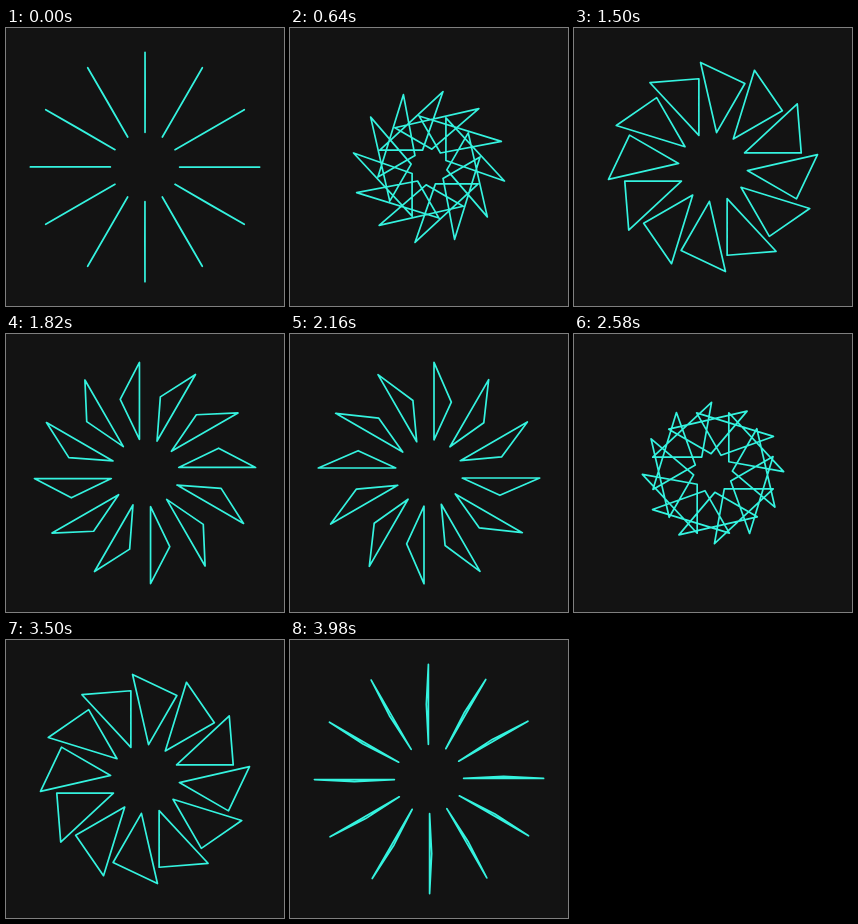
Recreate the animation shown at these times as an HTML page. Size 278 by 278 pixels, loop 4 s.

```html
<!DOCTYPE html>
<html lang="en">
<head>
<meta charset="utf-8">
<title>Folding triangles</title>
<style>
  html, body { margin: 0; width: 100%; height: 100%; overflow: hidden; background: #131313; }
  svg { display: block; width: 100%; height: 100%; }
  path { fill: none; stroke: #34f3df; stroke-width: 1.7; stroke-linejoin: round; }
</style>
</head>
<body>
<svg viewBox="-139 -139 278 278"><path id="ring"/></svg>
<script>
  const LOOP = 4000;
  const COUNT = 12;
  const SIDE = 80;
  const GAP = 20;

  // Equilateral triangle, set inside a 60 degree wedge
  const left = GAP * Math.sqrt(3);
  const triangle = [
    [left, GAP],
    [left + SIDE, GAP],
    [left + SIDE / 2, GAP + SIDE * Math.sqrt(3) / 2]
  ];

  const ring = document.getElementById('ring');
  const start = performance.now();

  // Squash and shear the triangle through the turn
  function fold([x, y], turn) {
    const s = Math.sin(turn);
    return [x * Math.cos(turn) - y * s ** 3, y * s];
  }

  function rotate([x, y], angle) {
    const c = Math.cos(angle), s = Math.sin(angle);
    return [x * c - y * s, x * s + y * c];
  }

  const format = p => p.map(v => v.toFixed(3)).join(' ');

  function draw() {
    const time = Math.max(0, performance.now() - start) % LOOP;
    const turn = time / LOOP * 2 * Math.PI;
    const folded = triangle.map(p => fold(p, turn));
    let d = '';
    for (let i = 0; i < COUNT; i++) {
      const angle = i / COUNT * 2 * Math.PI;
      d += 'M' + folded.map(p => format(rotate(p, angle))).join('L') + 'Z';
    }
    ring.setAttribute('d', d);
    requestAnimationFrame(draw);
  }

  draw();
</script>
</body>
</html>
```
